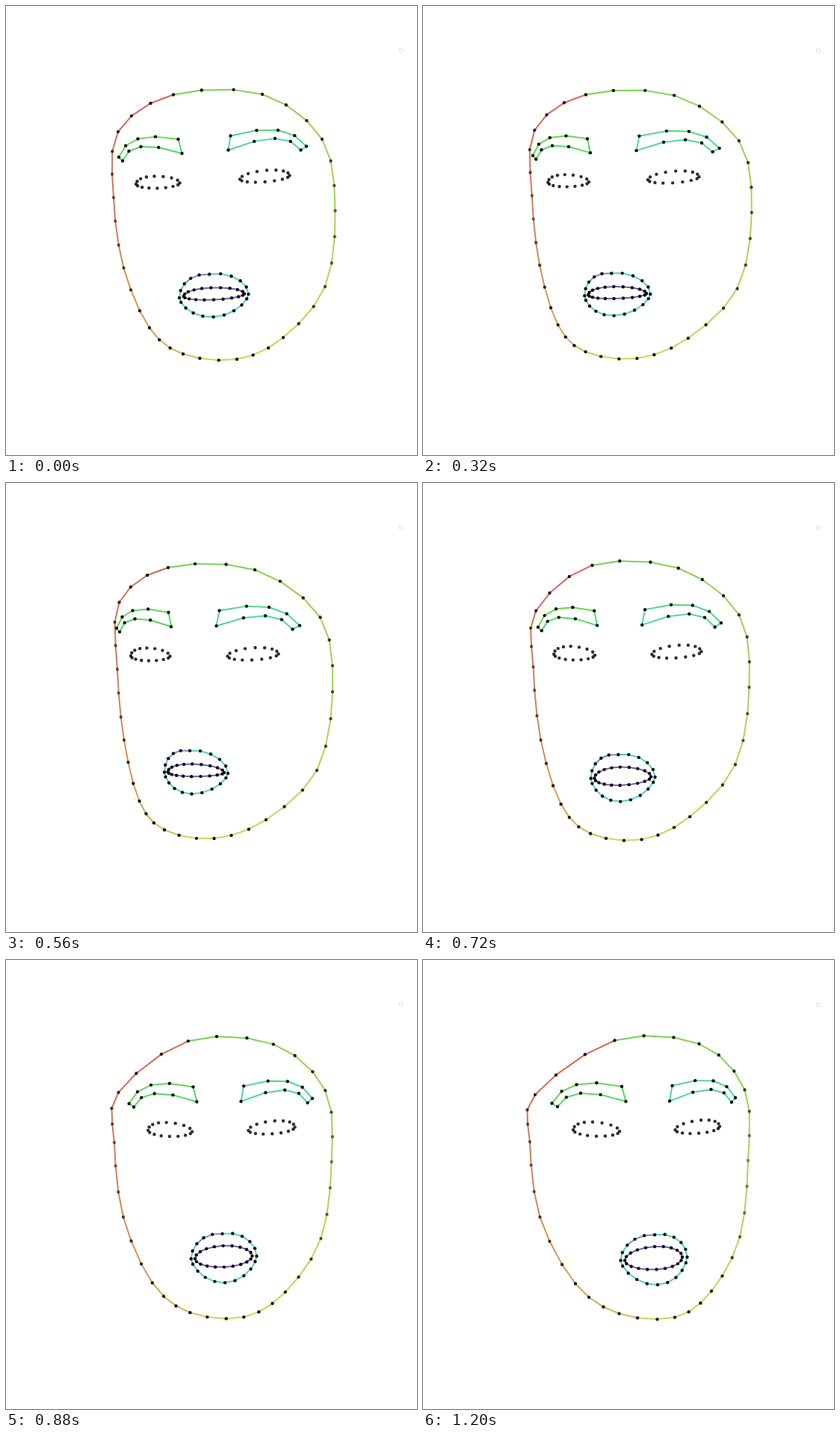
Write an HTML page with a canvas that moves like this. It is 550x600 px and loops after 1.28 s.

```html
<!DOCTYPE html>
<html lang="en">
<head>
<meta charset="utf-8">
<title>Face landmarks</title>
<style>
html, body { margin: 0; width: 100%; height: 100%; overflow: hidden; background: #fff; }
canvas { display: block; width: 550px; height: 600px; }
</style>
</head>
<body>
<canvas id="stage"></canvas>
<script>
const W = 550, H = 600, STEP = 80, STEPS = 16;
const { PI, sin, cos, max, exp, floor } = Math;
const mix = (a, b, w) => a + (b - a) * w;

// Closed smooth curve through the key points, with three dots per span.
function outline(...keys) {
  const n = keys.length, dots = [];
  for (let i = 0; i < n; i++) {
    const [a, b, c, d] = [-1, 0, 1, 2].map(k => keys[(i + k + n) % n]);
    for (let t = 0; t < .9; t += 1 / 3)
      dots.push([0, 1].map(k => b[k] + t / 2 * (c[k] - a[k]
        + t * (2 * a[k] - 5 * b[k] + 4 * c[k] - d[k] + t * (3 * (b[k] - c[k]) + d[k] - a[k])))));
  }
  return dots;
}

// Five dots on the parabola through three points.
function arch(a, b, c) {
  return [0, .25, .5, .75, 1].map(t => [0, 1].map(k =>
    a[k] * (1 - t) * (1 - 2 * t) + b[k] * 4 * t * (1 - t) + c[k] * t * (2 * t - 1)));
}
const brow = (a, b, c, d, e, f) => [...arch(a, b, c), ...arch(d, e, f)];

// Almond between two corners; each half has a height and a sideways skew.
function almond(n, [x0, y0], [x1, y1], [up, skewUp], [down, skewDown], { dip = 0, sharp = 1 } = {}) {
  return Array.from({ length: n }, (_, i) => {
    const angle = 2 * PI * i / n, u = (1 - cos(angle)) / 2, s = Math.abs(sin(angle));
    const top = i <= n / 2;
    const rise = top ? -up * s + dip * s ** 24 : down * s ** sharp;
    return [mix(x0, x1, u) + (top ? skewUp : skewDown) * s * s, mix(y0, y1, u) + rise];
  });
}
const eye = (...shape) => almond(16, ...shape);
const mouth = (...shape) => almond(20, ...shape);
const lips = (...shape) => almond(20, ...shape, { dip: 2, sharp: 1.3 });

const facing = {
  oval: outline([224, 118.5], [343, 118], [423, 178], [440.5, 273.5], [427, 375], [371, 443],
    [309, 472], [237, 465], [192, 430], [157.5, 350], [144, 256], [150, 168]),
  browL: brow([151, 202], [176.5, 177.5], [230.5, 178], [235.5, 197], [180.5, 188], [156, 207]),
  browR: brow([402, 187.5], [364, 166], [300.5, 173.5], [297.5, 192.5], [360, 177], [394.5, 192.5]),
  eyeL: eye([174, 238], [232.5, 236.5], [9.8, -4.8], [6.2, -.8]),
  eyeR: eye([313, 231.5], [379.5, 226.5], [9.5, 2.8], [6, .3]),
  lips: lips([232, 390], [324.5, 385], [31, -6], [28, -.7]),
  mouth: mouth([237.5, 388], [319, 384.5], [9.8, -4], [6.3, -.3])
};
const turned = {
  oval: outline([217, 113], [333, 116], [420.5, 179.5], [437, 279], [416, 384], [348, 450],
    [278.5, 475], [212, 463.5], [178.5, 425], [158, 343.5], [149, 249], [151.5, 159.5]),
  browL: brow([148, 194], [169.5, 170.5], [217.5, 173], [221, 192], [172.5, 181.5], [152, 199]),
  browR: brow([393, 190.5], [352, 166], [285.5, 170.5], [281.5, 191], [347, 177.5], [383.5, 195.5]),
  eyeL: eye([167, 231], [219.5, 231.5], [10.8, -4.8], [6.3, -2.3]),
  eyeR: eye([296.5, 231.5], [364.5, 228.5], [10, 3], [6.5, -1.5]),
  lips: lips([212, 386.5], [297, 388], [31.5, -8.5], [28.2, -6]),
  mouth: mouth([216.5, 386], [292, 387], [11, -5], [5.7, -6])
};
const speaking = {
  oval: outline([256.5, 107.5], [369.5, 112], [430.5, 173.5], [435, 268], [424, 370], [386, 442.5],
    [337, 477.5], [262.5, 472.5], [204, 432.5], [156.5, 343.5], [143, 243], [150, 180 - 28 + 28]),
  browL: brow([172.5, 191.5], [205.5, 166.5], [266, 169], [271.5, 189], [211, 178], [180, 196]),
  browR: brow([418, 184], [388.5, 161.5], [333.5, 168], [330, 188.5], [385.5, 173], [413, 190]),
  eyeL: eye([201, 227], [263, 229], [11.5, -5], [7.5, 0]),
  eyeR: eye([337.5, 227], [397, 222.5], [10.7, 4.8], [6.8, 1.8]),
  lips: lips([264.5, 401.5], [353.5, 397], [34, 1], [34.7, 5]),
  mouth: mouth([270, 401.5], [347, 397], [16.3, 1.5], [14.3, 4])
};
speaking.oval.key = null;
delete speaking.oval.key;
const poses = [facing, turned, speaking];
const fades = [.35, .27, .5];

// Step, sideways turn and vertical lift through the poses, widening of the head.
const moves = [
  [0, 0, 0, 0], [2, .26, .08, .003], [4, .74, .42, .013], [7, 1, 1, 0],
  [9, 1.24, 1.55, 0], [11, 1.68, 1.85, 0], [15, 2, 2, 0]
];
function moveAt(step) {
  const i = max(1, moves.findIndex(m => m[0] >= step)), a = moves[i - 1], b = moves[i];
  return a.map((v, k) => mix(v, b[k], (step - a[0]) / (b[0] - a[0])));
}

function blend(list, at, get) {
  const i = at < 1 ? 0 : 1;
  return mix(get(list[i]), get(list[i + 1]), at - i);
}

function faceAt(step) {
  const [, turn, lift, wide] = moveAt(step), parts = {};
  for (const name in facing)
    parts[name] = facing[name].map((_, i) => {
      const x = blend(poses, turn, p => p[name][i][0]);
      const y = blend(poses, lift, p => p[name][i][1]);
      return [x + (x - 291) * wide, y - (y - 290) * wide];
    });
  return { parts, fade: blend(fades, turn, v => v) };
}

// Green to yellow down the right side, then orange to red up the left.
const ovalHue = i => i < 20 ? 60 + 46 * (1 - i / 20) ** 1.5 : 10 + 40 * (1 - (i - 20) / 16) ** 1.7;
const strokes = {
  oval: i => `hsl(${ovalHue(i)} 60% 58%)`,
  browL: i => i < 4 ? "#66d84f" : "#55d95f",
  browR: i => i < 4 ? "#4bd883" : "#50d8a0",
  lips: i => i > 1 && i < 5 ? "#6f8fc9" : "#4fd8b4",
  mouth: i => i < 10 ? "#6a63b5" : "#7a5fae"
};

// Dots at the sides of the head lie deeper and look paler.
function dotAlpha(name, i, fade) {
  if (name.startsWith("eye")) return .82;
  if (name !== "oval") return .95;
  const near = c => exp(-(((i - c) / 3.8) ** 2));
  return .92 - fade * near(9.5) - .4 * near(29.5);
}

const canvas = document.getElementById("stage");
const ctx = canvas.getContext("2d");
const ratio = window.devicePixelRatio || 1;
canvas.width = W * ratio;
canvas.height = H * ratio;
ctx.scale(ratio, ratio);

function draw(step) {
  const { parts, fade } = faceAt(step);
  ctx.fillStyle = "#fff";
  ctx.fillRect(0, 0, W, H);
  ctx.lineWidth = 1;
  ctx.strokeStyle = "#e2e2e2";
  ctx.beginPath();
  ctx.roundRect(526.5, 57, 5, 5, 1);
  ctx.stroke();

  ctx.lineWidth = 2;
  ctx.lineCap = "round";
  for (const name in strokes) {
    const dots = parts[name];
    dots.forEach((dot, i) => {
      ctx.strokeStyle = strokes[name](i);
      ctx.beginPath();
      ctx.moveTo(...dot);
      ctx.lineTo(...dots[(i + 1) % dots.length]);
      ctx.stroke();
    });
  }
  for (const name in parts)
    parts[name].forEach(([x, y], i) => {
      ctx.fillStyle = `rgba(0, 0, 0, ${dotAlpha(name, i, fade)})`;
      ctx.beginPath();
      ctx.arc(x, y, 2.2, 0, PI * 2);
      ctx.fill();
    });
}

const begin = performance.now();
function tick() {
  const t = max(0, performance.now() - begin);
  draw(floor(t / STEP) % STEPS);
  requestAnimationFrame(tick);
}
tick();
</script>
</body>
</html>
```
